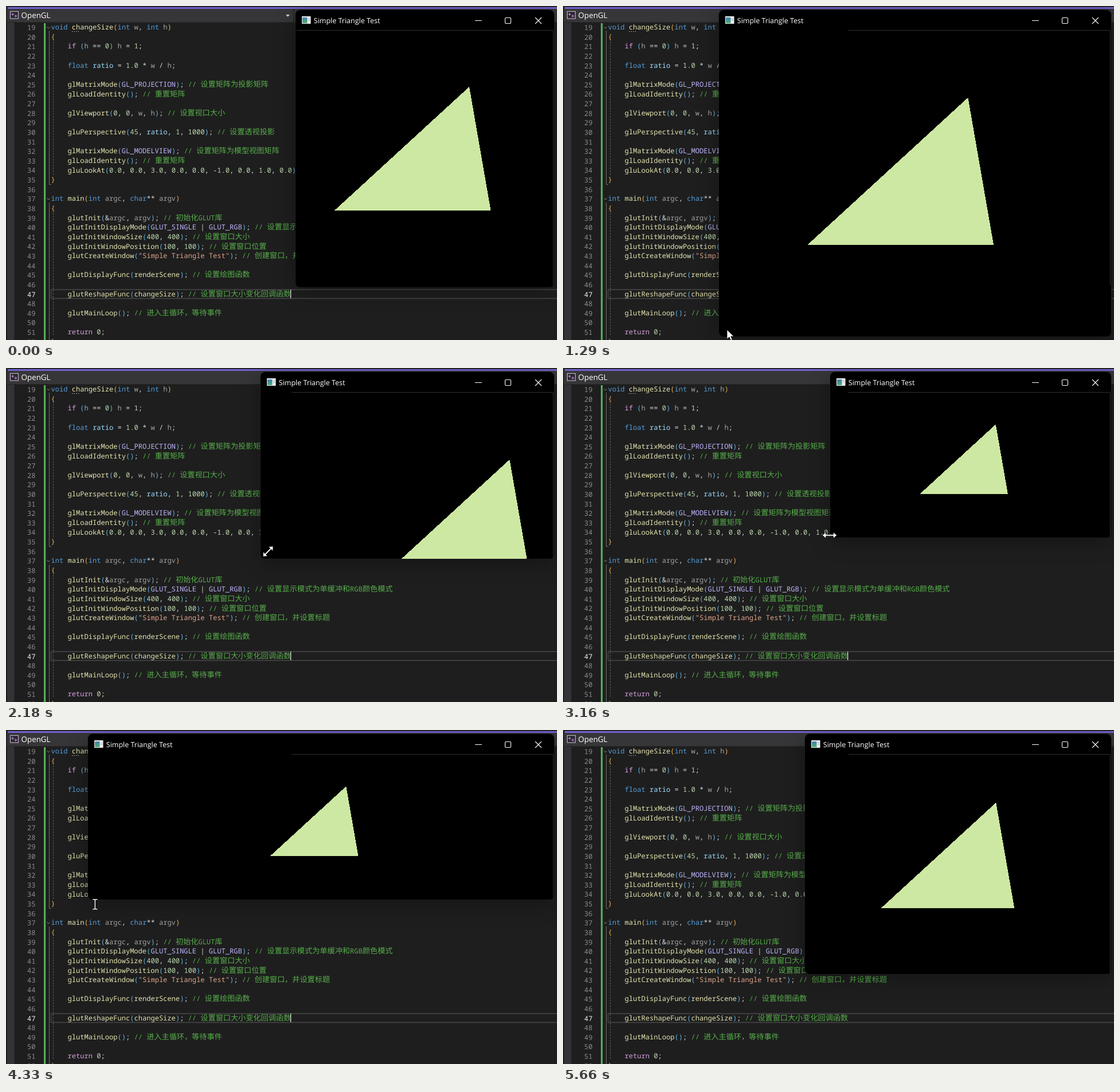
An HTML page that plays this animation: 961x583 px, repeating every 5.89 s.

```html
<!DOCTYPE html>
<html lang="zh-CN">
<head>
<meta charset="utf-8">
<title>OpenGL</title>
<style>
  html, body { margin: 0; width: 100%; height: 100%; overflow: hidden; background: #1e1e1e; }
  #stage { position: relative; width: 961px; height: 583px; overflow: hidden; }
  svg { position: absolute; left: 0; top: 0; display: block; }
  text { white-space: pre; text-rendering: geometricPrecision; }
  .mono { font: 12.07px "Noto Sans Mono", "DejaVu Sans Mono", monospace; }
  .cjk { font: 13.17px "Noto Sans CJK SC", "Noto Sans CJK", sans-serif; }
  .ui { font-family: "Open Sans", "Noto Sans", sans-serif; fill: #fff; }
  #win {
    position: absolute; top: 7px; background: #000; border-radius: 8px; overflow: hidden;
  }
  #shade {
    position: absolute; top: 7px; border-radius: 8px;
    box-shadow: 0 0 0 .5px #222, 0 8px 36px rgba(0, 0, 0, .3);
  }
  #strip { position: absolute; left: 2px; right: 1px; bottom: 0; background: #fff; border-radius: 2px 0 8px 8px; }
</style>
</head>
<body>
<div id="stage">
  <svg width="961" height="583">
    <rect width="961" height="583" fill="#1e1e1e"/>
    <rect width="961" height="29" fill="#252526"/>
    <rect y="2" x="3" width="958" height="3" fill="#7163d2"/>
    <rect y="5" x="2" width="499" height="23" fill="#363638"/>
    <rect y="5" x="503" width="458" height="23" fill="#363638"/>
    <rect y="29" x="2" width="12.5" height="554" fill="#333335"/>
    <g fill="none" stroke="#b98ad0" stroke-width="1.2">
      <rect x="7.5" y="9.5" width="14" height="12.5" fill="#2b2630" stroke="#b9b0c0"/>
      <path d="M9 14.5h5M11.5 12v5M14.5 17.5h5M17 15v5"/>
    </g>
    <text class="ui" x="26.5" y="21.3" font-size="13.4">OpenGL</text>
    <path d="M488 15h7l-3.5 4z" fill="#d0d0d0"/>
    <rect x="66" y="30" width="3.2" height="553" fill="#55ad57"/>
    <g fill="none" stroke="#8a8a8a">
      <path d="M71.5 36.5l2.5 2.5 2.5-2.5M71.5 335.5l2.5 2.5 2.5-2.5"/>
      <path d="M75.5 43V311.5H79M75.5 343V583" stroke="#707070"/>
      <path d="M82.5 62V295M82.5 361V576" stroke="#606060" stroke-dasharray="3 2"/>
      <path d="M115 44.5h14" stroke="#b0b0b0" stroke-dasharray="1.5 2"/>
    </g>
    <rect x="78.5" y="495" width="890" height="15.5" fill="none" stroke="#464646" stroke-width="1.6"/>
    <g id="code"></g>
    <rect id="caret" x="496" y="495" width="1.2" height="15" fill="#e8e8e8"/>
  </svg>

  <div id="shade"></div>
  <div id="win">
    <div id="strip"></div>
    <svg width="961" height="583">
      <defs>
        <linearGradient id="tint" x2="0" y2="1">
          <stop stop-color="#3f7fb5"/><stop offset="1" stop-color="#4fae74"/>
        </linearGradient>
      </defs>
      <rect x="11" y="11" width="15.5" height="13" fill="#eee"/>
      <rect x="12" y="13" width="8.5" height="10" fill="url(#tint)"/>
      <path d="M22 15h3M22 18h3" stroke="#999"/>
      <text class="ui" x="31.8" y="22.6" font-size="12.5">Simple Triangle Test</text>
      <polygon id="tri" fill="#cde8a2" shape-rendering="crispEdges"/>
      <g id="bar" fill="none" stroke="#fff" stroke-width="1.1">
        <path d="M818 25.5h12M923 20l11 11M934 20l-11 11"/>
        <rect x="870.5" y="20.5" width="10" height="10" rx="1.5"/>
        <path id="rule" stroke="#303030" stroke-width="1"/>
      </g>
    </svg>
  </div>

  <svg width="961" height="583">
    <g id="cursor">
      <path id="arrow" d="M0 0V16.5L4 12.8L6.6 18.6L9.4 17.4L6.8 11.8H12Z" fill="#fff" stroke="#000" stroke-width=".8"/>
      <g id="beam" fill="none">
        <path d="M-4 -8.5h3l1 1l1-1h3M-4 8.5h3l1-1l1 1h3M0-8V8" stroke="#000" stroke-width="3"/>
        <path d="M-4 -8.5h3l1 1l1-1h3M-4 8.5h3l1-1l1 1h3M0-8V8" stroke="#fff" stroke-width="1.5"/>
      </g>
      <path id="horz" d="M-12.5 0l6-5.2v4h13v-4l6 5.2l-6 5.2v-4h-13v4z" fill="#fff" stroke="#000" stroke-width=".6"/>
      <path id="diag" d="M-12.5 0l6-5.2v4h13v-4l6 5.2l-6 5.2v-4h-13v4z" transform="rotate(-45)" fill="#fff" stroke="#000" stroke-width=".6"/>
    </g>
  </svg>
</div>

<script>
const $ = id => document.getElementById(id);
const NS = 'http://www.w3.org/2000/svg';
const LOOP = 5890, CH = 7.243, CJK = 13.17, ROW = 16.625;

const source = `void changeSize(int w, int h)
{
    if (h == 0) h = 1;

    float ratio = 1.0 * w / h;

    glMatrixMode(GL_PROJECTION); // 设置矩阵为投影矩阵
    glLoadIdentity(); // 重置矩阵

    glViewport(0, 0, w, h); // 设置视口大小

    gluPerspective(45, ratio, 1, 1000); // 设置透视投影

    glMatrixMode(GL_MODELVIEW); // 设置矩阵为模型视图矩阵
    glLoadIdentity(); // 重置矩阵
    gluLookAt(0.0, 0.0, 3.0, 0.0, 0.0, -1.0, 0.0, 1.0, 0.0);
}

int main(int argc, char** argv)
{
    glutInit(&argc, argv); // 初始化GLUT库
    glutInitDisplayMode(GLUT_SINGLE | GLUT_RGB); // 设置显示模式为单缓冲和RGB颜色模式
    glutInitWindowSize(400, 400); // 设置窗口大小
    glutInitWindowPosition(100, 100); // 设置窗口位置
    glutCreateWindow("Simple Triangle Test"); // 创建窗口，并设置标题

    glutDisplayFunc(renderScene); // 设置绘图函数

    glutReshapeFunc(changeSize); // 设置窗口大小变化回调函数

    glutMainLoop(); // 进入主循环，等待事件

    return 0;
}`;

const rules = [
  [/^\/\/.*/, '#57ae4b'],
  [/^"[^"]*"/, '#dca38a'],
  [/^(if|return)\b/, '#d8a0df'],
  [/^(void|int|float|char)\b/, '#569cd6'],
  [/^GL[A-Z]*_\w+/, '#beb7ff'],
  [/^(\w+(?=\()|renderScene|changeSize)/, '#e4e4b0'],
  [/^(argc|argv|w|h)\b/, '#a2a2a2'],
  [/^ratio\b/, '#9cdcfe'],
  [/^\d[\d.]*/, '#bbd6ae'],
  [/^[(){}]/, ''],
  [/^\s+/, null],
  [/^[^\s\w(){}"\/]+|^./, '#d8d8d8']
];
const levels = ['#f0b04c', '#5fb4ea', '#d58fd6'];

function put(str, x, y, fill, cls = 'mono') {
  const el = document.createElementNS(NS, 'text');
  el.setAttribute('class', cls);
  el.setAttribute('x', x);
  el.setAttribute('y', y);
  el.setAttribute('fill', fill);
  el.textContent = str;
  $('code').append(el);
}

let depth = 0;
source.split('\n').forEach((line, i) => {
  const y = 41.2 + i * ROW;
  put(19 + i, 37, y + .8, i === 28 ? '#f0f0f0' : '#8c8c8c');
  let x = 78.6;
  while (line) {
    const [re, color] = rules.find(r => r[0].test(line));
    const word = line.match(re)[0];
    let fill = color;
    if (color === '') {
      if (/[)}]/.test(word)) depth--;
      fill = levels[depth % 3];
      if (/[({]/.test(word)) depth++;
    }
    // wide and narrow characters use different fonts and advances
    for (const part of word.match(/[\x00-\xff]+|[^\x00-\xff]+/g)) {
      const wide = part.charCodeAt(0) > 255;
      if (fill) put(part, x, y, fill, wide ? 'cjk' : 'mono');
      x += part.length * (wide ? CJK : CH);
    }
    line = line.slice(word.length);
  }
});

// bursts of screen updates: start, end, count
const bursts = [
  [0, 0, 1], [30, 550, 11], [740, 740, 1], [770, 1290, 11], [1350, 1910, 10],
  [1970, 2530, 12], [2580, 2910, 8], [3160, 3260, 2], [3450, 4000, 11],
  [4050, 4560, 12], [4770, 5320, 10], [5370, 5510, 4], [5660, 5660, 1]
];
const ticks = bursts.flatMap(([a, b, n]) =>
  Array.from({ length: n }, (_, i) => Math.round(a + (b - a) * i / Math.max(1, n - 1))));

// time, left edge, bottom edge
const frameKeys = [
  [0, 505, 491], [740, 505, 491], [770, 483, 500], [900, 405, 530], [1050, 318, 560],
  [1190, 272, 577], [1530, 272, 577], [1720, 294, 551], [1910, 357, 481], [1970, 385, 440],
  [2150, 440, 340], [2300, 466, 296], [3450, 466, 296], [3890, 143, 296],
  [4770, 143, 296], [5080, 422, 426]
];
// time, x, y, pointer shape
const pointKeys = [
  [0, 440, 590, ''], [30, 440, 578, 'beam'], [290, 470, 540, 'beam'], [450, 500, 497, 'diag'],
  [550, 505, 491, 'diag'], [740, 505, 491, 'diag'], [770, 471, 508, 'diag'], [900, 393, 538, 'diag'],
  [1050, 306, 566, 'diag'], [1190, 268, 574, 'diag'], [1230, 280, 570, 'arrow'], [1290, 286, 565, 'arrow'],
  [1350, 286, 565, 'arrow'], [1470, 273, 576, 'diag'], [1530, 273, 576, 'diag'], [1720, 307, 532, 'diag'],
  [1910, 380.5, 444.5, 'diag'], [1970, 408, 402, 'diag'], [2150, 455, 325, 'diag'], [2300, 468, 295, 'diag'],
  [2460, 478, 283, 'arrow'], [2530, 480, 281, 'arrow'], [2910, 468, 292, 'arrow'], [3160, 465, 292, 'horz'],
  [3450, 465, 292, 'horz'], [3890, 145, 292, 'horz'], [4000, 148, 288, 'arrow'], [4050, 150, 295, 'beam'],
  [4320, 155.5, 304.5, 'beam'], [4500, 152, 297, 'diag'], [4770, 152, 297, 'diag'], [5080, 430, 428, 'diag'],
  [5140, 428, 446, 'beam'], [5320, 425, 574, 'beam'], [5440, 414, 584, 'beam'], [5510, 412, 600, '']
];

function at(keys, t) {
  let i = keys.length - 1;
  while (i && keys[i][0] > t) i--;
  const a = keys[i], b = keys[i + 1] || a;
  const k = b === a ? 0 : (t - a[0]) / (b[0] - a[0]);
  return [a[1] + (b[1] - a[1]) * k, a[2] + (b[2] - a[2]) * k, a[3]];
}

function draw(t) {
  let i = ticks.length - 1;
  while (i && ticks[i] > t) i--;
  const now = ticks[i];
  // the scene is repainted one update late, and not at all while shrinking
  const painted = now >= 1350 && now < 2400 ? 1290 : ticks[Math.max(0, i - 1)];
  const [left, bottom] = at(frameKeys, now).slice(0, 2).map(Math.round);
  const [oldLeft, oldBottom] = at(frameKeys, painted).slice(0, 2).map(Math.round);

  for (const el of [$('win'), $('shade')]) {
    el.style.left = left + 'px';
    el.style.width = 956 - left + 'px';
    el.style.height = bottom - 7 + 'px';
  }
  $('strip').style.height = Math.max(0, bottom - oldBottom) + 'px';
  $('bar').setAttribute('transform', `translate(${-left} -7)`);
  $('rule').setAttribute('d', `M${Math.max(498, left + 2)} 42.5H954.5V${Math.min(bottom, 491) - 4}`);

  const h = oldBottom - 43, k = h / 448;
  const cx = (956 - oldLeft) / 2, cy = 36 + h / 2;
  $('tri').setAttribute('points', [[77.5, -126], [-157.5, 89.8], [115, 89.8]]
    .map(([x, y]) => [cx + x * k, cy + y * k]).join(' '));

  const [px, py, shape] = at(pointKeys, now);
  $('cursor').setAttribute('transform', `translate(${px} ${py})`);
  for (const id of ['arrow', 'beam', 'horz', 'diag']) {
    $(id).style.display = id === shape ? '' : 'none';
  }
  $('caret').style.display = Math.floor((now + 390) / 550) % 2 ? 'none' : '';
}

const start = performance.now();
function loop() {
  draw((performance.now() - start) % LOOP);
  requestAnimationFrame(loop);
}
loop();
</script>
</body>
</html>
```
